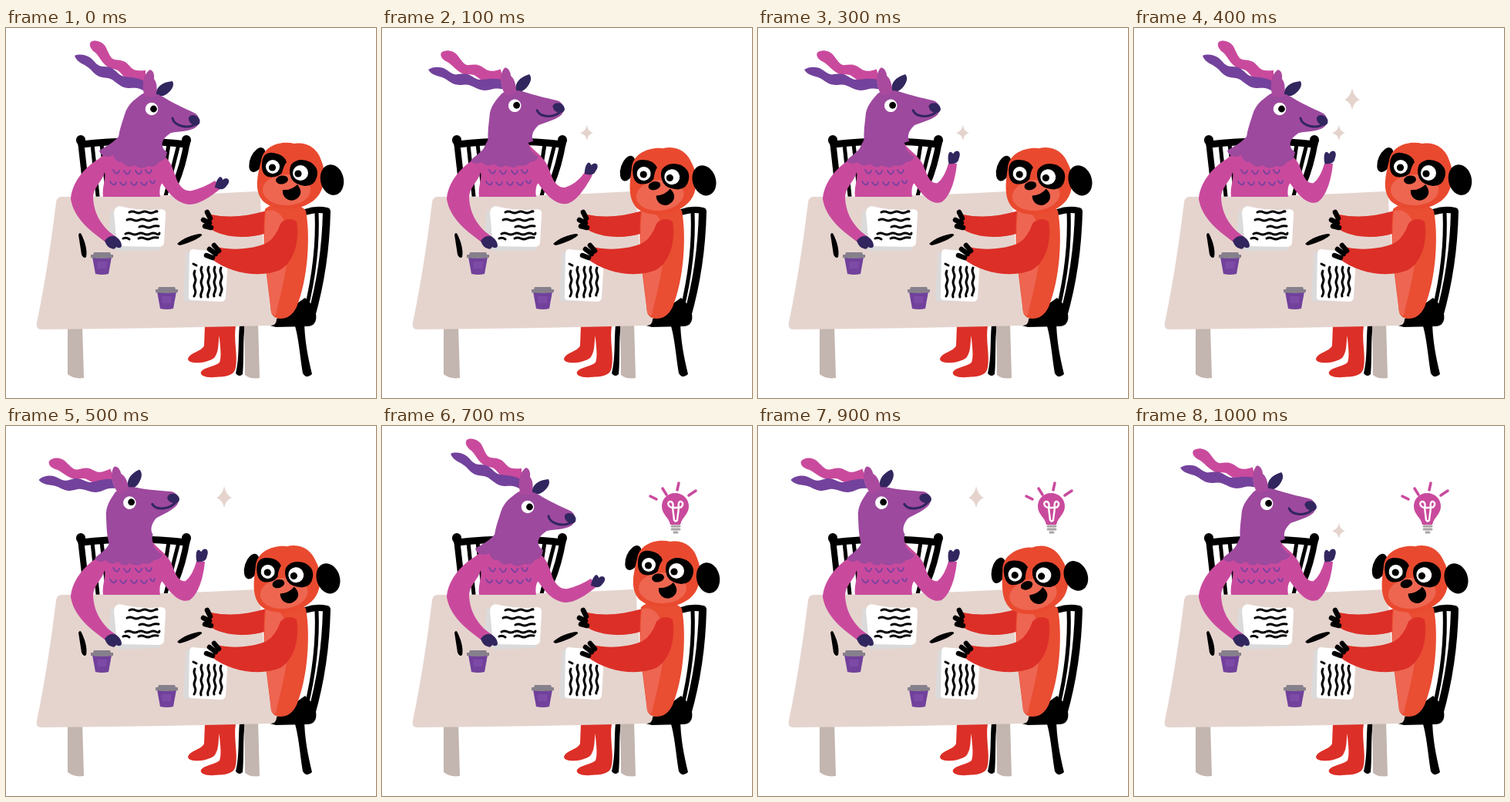
Animation of 480 by 480 pixels, one loop 1100 ms. Source, as an HTML page:

```html
<!DOCTYPE html>
<html lang="en">
<head>
<meta charset="utf-8">
<title>Meeting of ideas</title>
<style>
html, body { margin: 0; width: 100%; height: 100%; overflow: hidden; background: #fff }
svg { display: block; width: 100vw; height: 100vh }
.line { fill: none; stroke: #000; stroke-linecap: round; stroke-linejoin: round }
.navy { fill: #32265f }
.pink { fill: #c94a9d }
.plum { fill: #9d499e }
.red { fill: #dc2f27 }
.sand { fill: #e5d4ce }
</style>
</head>
<body>
<svg viewBox="0 0 480 480">
  <!-- back chair -->
  <g class="line" stroke-width="6">
    <path d="M98 151Q166 143 234 151" stroke-width="9"/>
    <path d="M97 147L105 218M235 147C231 172 225 190 219 204" stroke-width="8"/>
    <path d="M112 151L119 218M124 151L130 200M224 151L207 218M211 151L205 190" stroke-width="5"/>
    <path d="M97 145v1M234 145v1" stroke-width="12"/>
  </g>

  <!-- legs and side chair -->
  <path class="red" d="M258 386H279C274 404 278 419 270 428C260 435 239 437 236 430C237 421 254 420 257 412ZM276 386H298C295 405 301 425 298 440C296 453 282 452 270 453C260 454 251 451 253 446C257 440 271 439 277 434C281 424 276 404 276 386Z"/>
  <path d="M303 385H310C307 405 309 430 307 449Q302 454 298 448C303 428 301 405 303 385ZM373 380L387 378C387 405 392 428 397 449Q390 456 385 448C381 424 380 401 373 380Z"/>
  <g class="line">
    <path d="M388 239Q403 234 416 237" stroke-width="8"/>
    <path d="M416 238C415 282 410 325 396 374" stroke-width="10"/>
    <path d="M403 239C405 285 399 325 389 366" stroke-width="5"/>
  </g>
  <path d="M335 384C358 378 372 360 388 350L400 362C405 378 402 386 392 387L350 388Z"/>
  <path fill="#c3b5af" d="M80 385H99L101 454Q88 456 80 449ZM309 382H327L329 454Q317 456 310 450Z"/>

  <!-- table -->
  <path class="sand" d="M72 219Q200 219 324 212Q330 212 330 219C331 270 338 320 351 378Q351 385 344 386Q190 390 46 391Q38 391 40 382C51 330 59 275 65 226Q66 219 72 219Z"/>
  <path fill="#dadada" d="M136 237L200 242L199 288L145 290L133 270ZM234 290L284 296L280 354L232 354Q229 352 230 346Z"/>
  <path fill="#fff" d="M147 231Q176 238 202 235Q208 236 207 242L205 279Q204 284 198 284L150 283Q146 281 143 272L140 239Q141 232 147 231ZM242 287L284 291Q289 292 288 298L285 350Q284 355 278 355L240 353Q236 352 237 346L238 292Q239 287 242 287Z"/>
  <g class="line" stroke-width="3">
    <path d="M160 239q4-2 8 0t8 0 8 0 8 0 4-1M157 249q4-2 8 0t8 0 8 0 8 0 7-1M173 258q4-2 8 0t8 0 9-1M155 267q4-2 8 0t8 0 8 0 8 0 8 0 4-1M152 273q4-2 8 1M172 273q4-2 8 0t8 0 9-1"/>
    <path d="M243 306l4 2M245 315q-2 4 0 8t0 8 0 8 -1 9M254 310q-2 4 0 8t0 8 0 8 0 8 -1 7M263 310q-2 4 0 8t0 8 0 8 0 8 -1 7M271 310q-2 4 0 8t0 8 0 8 0 8 -1 6M279 311q-2 4 0 8t0 8 0 8 0 8 -1 4"/>
  </g>
  <path d="M94 268Q96 264 98 268C102 276 106 288 104 297Q101 300 98 294ZM222 280C229 273 242 268 252 267Q256 268 253 270C245 276 233 280 225 282Z"/>
  <g id="cup">
    <path fill="#71419b" d="M112 297H137L133 319Q125 321 116 319Z"/>
    <path fill="#7d4ba5" d="M118 303H131L130 312H119Z"/>
    <path fill="#86808c" d="M114 291H135L136 294H139V298Q125 300 110 298V294H113Z"/>
  </g>
  <use href="#cup" x="84" y="45"/>

  <!-- antelope -->
  <path class="pink" d="M126 219C124 207 130 196 128 187C125 199 113 207 113 220C114 243 126 260 143 271L131 279C110 264 88 247 84 222C85 202 101 181 120 170L145 150H190C195 158 207 164 214 177L221 195L207 204C202 195 198 208 200 219Z"/>
  <path class="navy" d="M128 276Q135 267 143 271Q150 276 150 283Q148 287 143 284Q141 288 137 286Q131 285 128 276Z"/>
  <path class="line" style="stroke:#7b429f" stroke-width="2" d="M139 184q5 9 8 1M153 185q5 9 8 0M168 185q5 9 8 0M181 184q5 9 8 0M135 199q5 8 8 1M148 200q5 8 8 0M162 200q5 8 8 0M175 200q5 8 8 0M187 198q4 7 6 0"/>
  <path class="pink" id="arm"/>
  <path class="navy" id="hand" d="M-10 5C-9-2-6-8-3-9Q0-8 0-5Q5-9 8-5Q9-1 5 3Q2 8-4 7Z"/>
  <path class="plum" id="bib"/>
  <g id="goat">
    <path class="pink" d="M110 18C117 14 126 19 129 24C133 31 135 40 141 41C152 42 155 43 161 50C165 55 171 56 181 55V73C170 67 159 71 153 63C147 57 147 54 138 53C127 51 123 39 116 32C110 28 107 22 110 18Z"/>
    <path fill="#73429c" d="M89 36C95 33 105 35 110 39C116 44 118 50 127 50C138 50 141 55 147 60C154 66 162 61 178 68V81C166 75 163 80 153 77C143 73 140 66 132 65C121 64 117 62 110 54C104 47 92 46 89 36Z"/>
    <path class="navy" d="M194 86C195 77 202 70 216 69Q220 77 208 86Q200 91 194 86Z"/>
    <path class="plum" d="M176 86C184 82 196 84 208 92C222 100 236 106 246 111C252 116 252 124 246 129C238 134 226 134 214 136C206 141 201 147 203 155L150 160C140 150 150 125 154 112C158 98 168 92 176 86Z"/>
    <path fill="#a94a9e" d="M180 89C175 73 179 59 187 54Q193 56 192 66C197 72 196 82 194 89Z"/>
    <path class="navy" d="M237 116Q240 111 247 114Q253 118 251 124Q248 128 243 126Q236 122 237 116Z"/>
    <path class="line" style="stroke:#32265f" stroke-width="3" d="M216 117C218 127 236 132 247 124"/>
    <circle cx="189" cy="105" r="8.3" fill="#fff"/>
    <circle cx="191.5" cy="105" r="4.4"/>
  </g>

  <!-- red panda-like friend -->
  <path class="red" d="M266 242C290 247 314 244 338 237V266C315 274 281 273 263 259Z"/>
  <path fill="#e94d32" d="M336 235C350 222 378 224 389 237C395 270 392 325 377 362Q369 378 355 377Q346 376 344 369C339 325 331 280 336 235Z"/>
  <path fill="#ee6551" d="M337 238C352 232 364 246 366 272C367 310 356 345 350 373Q345 373 344 368C340 324 332 281 337 238Z"/>
  <path class="red" d="M356 254Q365 244 377 251C381 277 374 302 357 313C332 325 292 319 267 300L274 284C298 290 325 285 338 279Q350 272 356 254Z"/>
  <path class="line" stroke-width="6.5" d="M261 239l4 8M256 249l8 4M258 257l8 2M270 282l6 7M264 287l8 6M260 295l8 3"/>
  <g id="panda">
    <ellipse cx="326" cy="171" rx="9" ry="17" transform="rotate(24 326 171)"/>
    <path fill="#e94a2f" d="M331 172C334 152 358 146 374 150C392 147 405 158 409 172C417 190 413 216 396 226C378 238 350 238 335 226C322 214 325 195 331 172Z"/>
    <ellipse cx="423" cy="197" rx="15" ry="20" transform="rotate(-12 423 197)"/>
    <ellipse cx="364" cy="210" rx="31" ry="20" fill="#ee6650"/>
    <path d="M332 176Q333 160 347 162Q361 164 364 174Q360 179 358 188Q352 195 340 193Q331 190 332 176ZM370 177Q380 167 395 174Q407 182 403 194Q400 205 388 205Q374 203 370 195Q366 185 370 177Z"/>
    <g fill="#fff">
      <circle cx="346" cy="180" r="9"/><circle cx="382" cy="188" r="10"/>
    </g>
    <circle cx="345.5" cy="181" r="4.6"/><circle cx="379" cy="189" r="4.6"/>
    <ellipse cx="358" cy="197" rx="8" ry="5.5" transform="rotate(-8 358 197)"/>
    <path d="M359 210Q370 211 378 203Q386 213 379 220Q371 227 363 221Q358 216 359 210Z"/>
  </g>

  <!-- ideas -->
  <path class="sand" id="big" d="M283 78Q285 89 293 93Q285 96 283 106Q281 96 273 93Q281 89 283 78Z"/>
  <path class="sand" id="small" d="M266 126Q267 134 274 136Q267 138 266 146Q264 138 257 136Q264 134 266 126Z"/>
  <g id="bulb">
    <path class="pink" d="M380 87C391 87 398 95 398 104C398 115 389 118 387 128H374C372 118 363 115 363 104C363 95 370 87 380 87Z"/>
    <path class="line" style="stroke:#a9a4a5" stroke-width="3" d="M376 130H386M376 134H386M379 138H383"/>
    <path class="line" style="stroke:#fff" stroke-width="2.4" d="M379 122L377 106C370 105 370 98 374 98C378 98 378 104 377 106H385C384 102 385 97 388 98C392 100 390 106 385 106L383 122Q381 125 379 122"/>
    <path class="line" style="stroke:#c94a9d" stroke-width="3.5" d="M348 91L356 95M364 81L369 89M385 74L383 83M398 90L407 84"/>
  </g>
</svg>
<script>
const $ = id => document.getElementById(id);
const STEP = 100, COUNT = 11;

// One digit per step picks the pose of each part.
const goatSteps = '01210210121', pandaSteps = '01210110121',
      armSteps = '01222210122', sparkSteps = '02123120212', bulbFrom = 7;

const goatPoses = ['', 'translate(-17 -4) rotate(-12 188 104)', 'translate(-29 -5) rotate(-20.5 188 104)'];
const pandaPoses = ['', 'translate(-6 6) rotate(-6 374 185)', 'translate(-12 7) rotate(-11 374 185)'];
const bibDown = 'M152 130C146 146 134 151 121 159C123 167 132 169 139 165Q142 175 151 174Q157 183 167 178Q176 185 184 179Q194 182 198 174Q208 172 209 161Q202 157 202 148L205 135Z';
const bibUp = 'M142 135C138 144 135 150 132 156C127 163 120 166 115 172q6 7 14 2q8 8 16 2q8 8 16 2q9 6 17 0q8 3 14-4q8 0 11-7C194 162 188 154 190 140Z';
const arms = [
  { d: 'M203 178L214 177C221 197 226 213 241 211Q257 207 271 198L279 208C264 220 250 229 238 229C219 227 210 212 200 198Z', at: 'translate(281 202)' },
  { d: 'M203 178L214 177C220 194 225 207 237 207Q252 203 264 186L273 191C263 209 252 225 240 228C222 230 210 212 200 198Z', at: 'translate(272 183) rotate(-8)' },
  { d: 'M203 178L214 177C219 193 225 203 233 201Q242 194 247 176H258C256 198 249 219 238 226C223 231 210 212 200 198Z', at: 'translate(255 168) rotate(-22)' }
];

const show = (id, on) => $(id).setAttribute('visibility', on ? 'visible' : 'hidden');

function draw(now) {
  const i = Math.floor(now / STEP) % COUNT;
  const arm = arms[armSteps[i]];
  $('goat').setAttribute('transform', goatPoses[goatSteps[i]]);
  $('bib').setAttribute('d', goatSteps[i] === '0' ? bibDown : bibUp);
  $('panda').setAttribute('transform', pandaPoses[pandaSteps[i]]);
  $('arm').setAttribute('d', arm.d);
  $('hand').setAttribute('transform', arm.at);
  show('big', sparkSteps[i] & 1);
  show('small', sparkSteps[i] & 2);
  show('bulb', i >= bulbFrom);
}

const start = performance.now();
function tick() {
  draw(performance.now() - start);
  requestAnimationFrame(tick);
}
tick();
</script>
</body>
</html>
```
